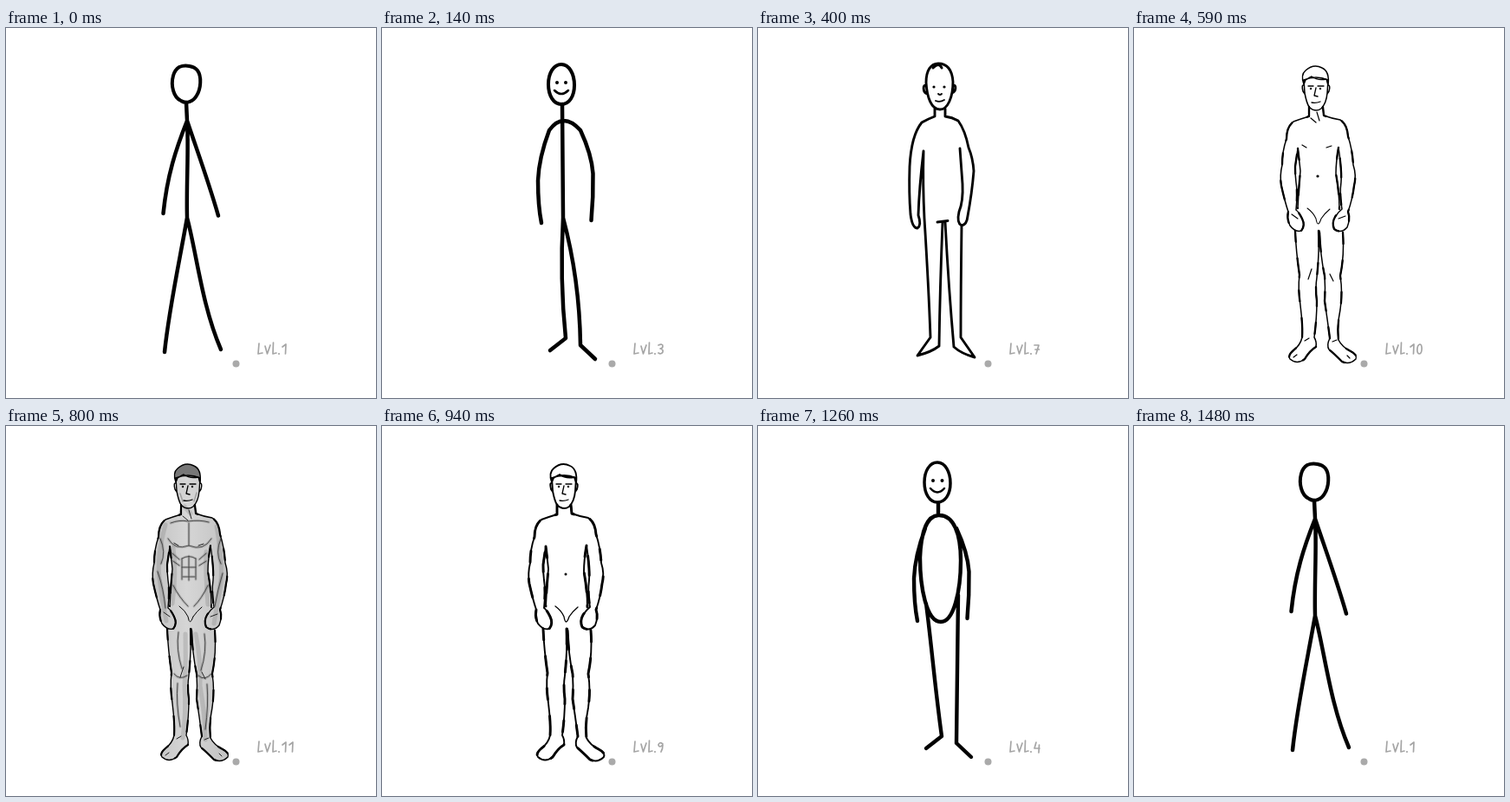
An HTML page with a canvas for the animation above (1510 ms loop, 427 by 427 pixels).

```html
<!DOCTYPE html>
<html lang="en">
<head>
<meta charset="utf-8">
<title>Figure levels</title>
<style>
html, body { margin: 0; width: 100%; height: 100%; overflow: hidden; background: #fff; }
canvas { display: block; width: 100vw; height: 100vh; }
</style>
</head>
<body>
<canvas id="stage" width="427" height="427" role="img" aria-label="A figure drawn in rising levels of detail"></canvas>
<script>
const ctx = document.getElementById('stage').getContext('2d');

const LOOP = 1510;
// Start time and level of each drawing.
const TIMELINE = [
  [0, 1], [70, 2], [130, 3], [200, 4], [260, 5], [330, 6], [400, 7], [460, 8], [530, 9], [590, 10],
  [660, 11], [730, 12], [800, 11], [870, 10], [930, 9], [1000, 8], [1070, 7], [1160, 6],
  [1190, 5], [1260, 4], [1330, 3], [1400, 2], [1480, 1]
];

function stroke(d, width, color = '#000', dash = []) {
  ctx.lineWidth = width;
  ctx.strokeStyle = color;
  ctx.setLineDash(dash);
  ctx.stroke(new Path2D(d));
}

function fill(d, color) {
  ctx.fillStyle = color;
  ctx.fill(new Path2D(d));
}

function dot(x, y, r, color = '#000') {
  ctx.fillStyle = color;
  ctx.beginPath();
  ctx.arc(x, y, r, 0, 7);
  ctx.fill();
}

function eyes(x1, x2, y, r) {
  dot(x1, y, r);
  dot(x2, y, r);
}

// Stick figures
const stick = {
  head: 'M200 45C207 42 217 44 221 49C226 56 225 70 220 78C216 85 208 88 202 84C193 80 190 66 193 55Q195 48 200 45Z',
  trunk: 'M208 86L209 107C211 140 208 180 209 219',
  arms: 'M209 107C196 140 186 170 181.5 214M209 107C220 140 233 175 245 216.5',
  legs: 'M209 219C200 270 188 325 183 374M209 219C220 260 226 320 248 371'
};

const oval = {
  head: 'M207 42C216 42 222 53 222 66C222 79 216 88 207 88C198 88 192 78 192 65C192 52 198 42 207 42Z',
  neck: 'M208 89V103',
  body: 'M208 103C226 102 234 125 234 155C234 190 226 226 211 226C194 226 187 185 187 152C188 125 194 104 208 103Z',
  arms: 'M193 118Q181 150 180 176Q180 205 184 225M229 118Q242 146 243.5 168Q244 195 241.5 222',
  legs: 'M194 205C200 250 204 300 212 358L194 372M231 195Q230 290 229 366L246 382'
};

const box = {
  head: 'M207 44C216 44 222 56 222 70C222 84 216 95 207 95C198 95 192 84 192 70C192 56 198 44 207 44Z',
  ears: 'M192 69C187 67 186 78 191 79M222 69C228 67 228 76 223 78',
  neck: 'M209 95V106',
  body: 'M193 114Q211 99 229 113Q232 120 232 160C232 190 230 205 227 218Q225 224 211 225Q199 225 196 219Q190 180 190 150Q189 125 193 114Z',
  arms: 'M191 115Q181 150 180 185Q181 210 187 234M229 113Q238 140 242 170Q243 195 240 224',
  legs: 'M195 215Q200 290 210 359L192 372M230 200Q233 280 231 366L249 382'
};

// Plain contour
const contour =
  'M204 93V102Q196 105 189 109C180 120 176 140 175 160Q174 190 176 215Q178 231 184 231Q189 228 185 216Q186 185 191 142' +
  'Q190 180 192 220Q197 300 199 357L184 378Q200 374 209 367Q210 300 213 224' +
  'M216 93V102Q224 103 231 107Q239 118 243 138Q248 150 249 165Q247 190 242 217Q241 227 235 228Q229 225 232 212Q237 200 236 180L233 139' +
  'M235 228Q234 300 234 357L250 380Q235 376 226 368Q220 300 216 224M207 224L219 222.5';
const plainHead = 'M194 63C194 48 200 41 208 41C218 41 224 48 225 62C225 80 219 94 210 94C200 94 195 80 194 63Z';
const plainEars = 'M194 66C190 65 190 74 195 76M225 66C229 65 229 73 224 75';

// Anatomical contour
const face = 'M196 60L197 75Q199 86 202 91Q209 98 216 93Q222 87 223 75L224 60Q210 54 196 60';
const ears = 'M196 66Q193 65 195 73L197 76M224 66Q227 66 225 73L223 76';
const hair = 'M196 65Q192 54 198 49Q207 41 217 46Q226 50 224 66L222 59Q212 61 205 56Q201 58 198 60Z';
const arms =
  'M202 91V102Q192 105 184 108Q176 114 176 128Q171 142 171 158Q168 170 170 182Q174 200 178 212Q176 220 180 228Q186 236 193 234Q198 228 194 220Q190 212 187 210Q189 190 187 178Q186 170 186 160L189 139' +
  'M218 91L219 101Q227 104 238 106Q246 111 247 125Q252 140 253 158Q257 170 254 182Q252 198 247 212Q250 220 246 230Q239 238 231 232Q228 225 232 218Q236 212 240 209Q237 192 239 178Q240 165 236 138';
const sides = 'M189 139Q191 155 192 165Q190 185 189 208M236 138Q233 155 233 168Q237 190 237 209';
const legs =
  'M186 234Q187 258 191 285Q189 300 192 320Q195 345 194 357Q192 366 184 372Q177 378 180 382Q188 389 197 382Q203 372 210 368Q211 362 208 357Q211 335 211 315Q209 300 211 288Q214 260 213 234' +
  'M241 236Q243 262 238 286Q241 305 238 325Q234 345 236 360Q240 368 250 373Q258 377 256 382Q249 389 240 385Q230 375 225 371Q222 366 226 358Q223 335 220 315Q221 300 220 286Q215 262 214 234';
const hips = 'M200 208Q207 213 210 220Q212 232 216 220M226 209Q220 214 216 220';
const torso = 'M202 88H218L219 101L238 107L236 138L233 168L237 210L241 237L214 240L186 235L189 210L192 165L189 138L184 108L202 102Z';
const features = 'M201 67H207M212 67H219M210 69L208 78L212 79M205 86Q210 87 215 85';
const details = 'M204 104L210 109M211 97L214 107M194 135L199 138M222 138L228 136M205 278L201 290M226 284L230 292M184 380L188 377M249 381L246 378M197 361L202 358M229 362L234 360M182 215L189 220M236 220L244 217';
const muscles =
  'M190 112Q200 108 210 110Q224 108 234 111M211 112V138M187 130Q195 144 211 138Q228 145 237 130' +
  'M203 153Q211 148 219 153M203 163H219M204 174H218M211 150V178M203 153V177M219 153V177' +
  'M192 147L200 154M193 156L200 161M231 147L223 154M231 156L223 161M193 184Q200 198 210 208M233 184Q226 199 217 208' +
  'M178 130Q185 145 179 159M248 130Q241 146 248 159M175 168Q182 188 184 210M250 170Q244 190 241 208' +
  'M199 238Q196 258 203 280M229 240Q232 260 225 282M194 286Q200 294 209 288M222 288Q229 295 237 286' +
  'M198 297Q196 320 201 347M232 298Q234 322 230 350';
const shade =
  'M184 114Q174 150 177 176Q180 200 185 225M243 116Q250 155 248 180Q244 205 240 228M193 140Q197 170 192 205M231 145Q230 170 233 206' +
  'M207 240Q208 270 206 300Q208 330 204 360M219 240Q225 270 224 300Q230 335 230 362M206 93L213 101';

function outline(width) {
  const lines = arms + sides + legs;
  stroke(lines, width);
  stroke(lines, width * 1.55, '#000', [13, 19, 22, 15]);
}

function anatomy(width) {
  outline(width);
  stroke(face + ears + hair, width);
  stroke(hips, width * .7);
}

function fineFace() {
  stroke(features, 1.3);
  eyes(204, 215, 70, 1.2);
}

function shaded(full) {
  if (full) {
    ctx.save();
    ctx.translate(209, 382);
    ctx.scale(1, .19);
    const shadow = ctx.createRadialGradient(0, 0, 10, 0, 0, 62);
    shadow.addColorStop(0, '#888');
    shadow.addColorStop(1, '#8880');
    ctx.fillStyle = shadow;
    ctx.fillRect(-62, -62, 124, 124);
    ctx.restore();
  }
  const skin = ctx.createLinearGradient(170, 0, 256, 0);
  skin.addColorStop(0, full ? '#a4a4a4' : '#c3c3c3');
  skin.addColorStop(.45, full ? '#d9d9d9' : '#d6d6d6');
  skin.addColorStop(1, full ? '#9a9a9a' : '#c2c2c2');
  [arms, torso, legs, face].forEach(part => fill(part, skin));
  stroke(shade, full ? 7 : 5, full ? '#5555' : '#7774');
  stroke(muscles, 3, '#6664');
  fill(hair, full ? '#444' : '#777');
  anatomy(1.4);
  stroke(muscles, full ? 1.1 : .8, '#333');
  stroke(details, 1, '#222');
  stroke('M201 78L204 87M220 77L217 87', 1.5, '#7778');
  fineFace();
}

const draw = {
  1() {
    stroke(stick.head, 4);
    stroke(stick.trunk + stick.arms + stick.legs, 4.5);
  },
  2() {
    draw[1]();
    eyes(203, 213, 62, 1.8);
    stroke('M202 73Q208 77 214 73', 2.5);
  },
  3() {
    stroke(oval.head, 4);
    stroke('M208 88L209 219' + oval.arms + 'M193 118Q209 96 229 118M209 219Q205 290 212 358L194 372M209 219Q228 290 229 366L246 382', 4.5);
    eyes(202, 212, 63, 2);
    stroke('M199 72Q207 80 215 72', 2.5);
  },
  4() {
    stroke(oval.head, 3.5);
    stroke(oval.neck + oval.body + oval.arms + oval.legs, 4.4);
    eyes(202, 212.5, 63, 2);
    stroke('M199 72Q207 81 215 72', 2.5);
  },
  5() {
    stroke(box.head + box.ears, 3.1);
    stroke(box.neck + box.body + box.arms + box.legs, 4);
    eyes(202, 212.5, 69, 2);
    stroke('M203 84Q207 87 212 84', 2);
  },
  6() {
    stroke(plainHead + plainEars + contour, 3.4);
    eyes(203, 215, 68, 1.8);
    stroke('M205 83Q210 86 215 83', 2);
  },
  7() {
    stroke(plainHead + plainEars + contour, 2.9);
    stroke('M202 46Q209 39 212 46', 3);
    eyes(203, 215, 68, 1.6);
    stroke('M208 76Q210 78 212 76M205 84Q210 86 215 83', 1.8);
  },
  8() {
    stroke(arms + legs + sides + face + ears + hair, 2.5);
    stroke('M207 225H219M209 76L211 77M205 85H215', 2);
    eyes(204, 215, 70, 1.6);
  },
  9() {
    anatomy(1.9);
    fineFace();
    dot(212, 171, 1.5);
  },
  10() {
    anatomy(1.5);
    stroke(details, 1.2);
    fineFace();
    dot(212, 171, 1.6);
  },
  11() { shaded(false); },
  12() { shaded(true); }
};

// Hand-lettered digits, about 6 by 12 units
const DIGITS = [
  'M3 0C-1 1-1 11 2 11C6 11 6 0 3 0',
  'M0 3L4 0L3.5 11',
  'M0 2Q3-2 5 2Q5 5 0 11L6 10',
  'M0 1Q5-1 5 2Q5 5 2 5Q6 6 5 9Q3 12 0 10',
  'M2 0L0 7H6M5.5 3L5 12',
  'M6 0H1L0 5Q5 4 5 8Q4 12 0 10',
  'M4 0Q0 4 0 8Q1 12 4 10Q6 6 1 6',
  'M0 1H5L2 11M1 6H5.5',
  'M4 1Q0 0 1 3Q5 6 5 9Q2 13 0 9Q1 6 4 4Q5 1 3 0',
  'M5 2Q1-1 0 3Q1 7 5 3Q5 8 3 11'
];

function label(level) {
  const gray = '#a5a5a5';
  stroke('M292 364L291 376L296 375M299 367L301.5 376L305 366M308.5 363L308 376L312 375', 1.7, gray);
  dot(315, 376, 1.1, gray);
  [...String(level)].forEach((digit, i) => {
    ctx.save();
    ctx.translate(319 + i * 8, 365);
    stroke(DIGITS[digit], 1.7, gray);
    ctx.restore();
  });
}

function render(now) {
  const time = now % LOOP;
  const level = TIMELINE.findLast(([start]) => start <= time)[1];
  ctx.clearRect(0, 0, 427, 427);
  ctx.lineCap = ctx.lineJoin = 'round';
  draw[level]();
  label(level);
  dot(265.5, 387.5, 4, '#aaa');
}

const begin = performance.now();
function tick() {
  render(performance.now() - begin);
  requestAnimationFrame(tick);
}
tick();
</script>
</body>
</html>
```
